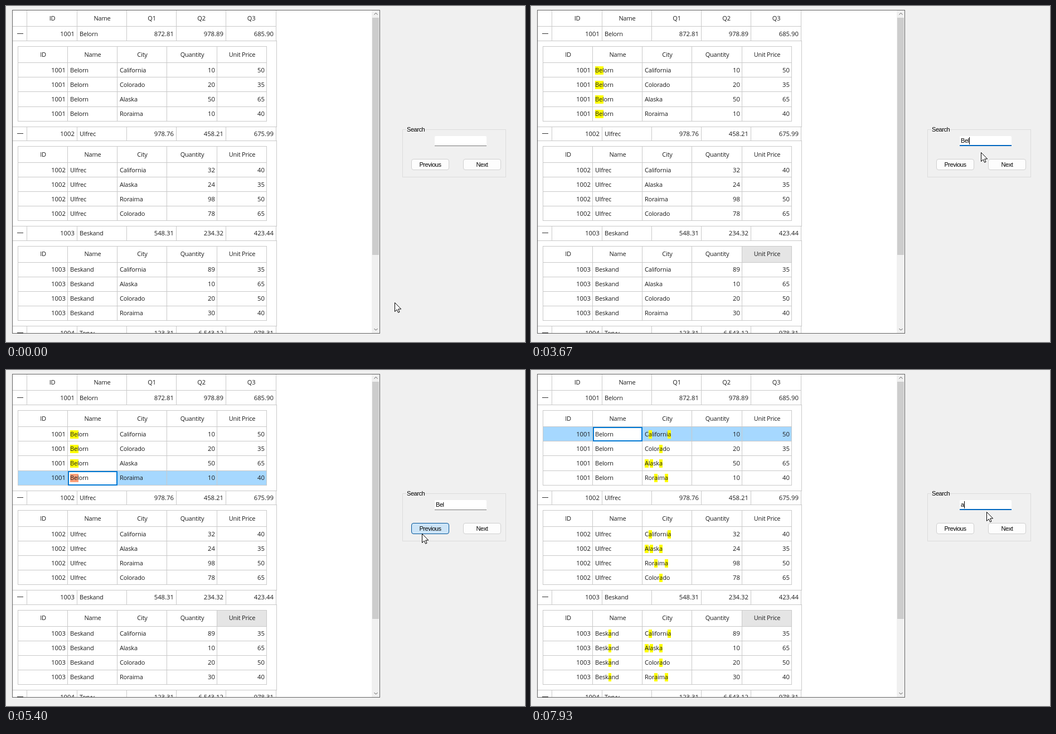
Animation, 931 px wide and 602 px high, one loop 8 s. Source, as an HTML page:

```html
<!DOCTYPE html>
<html lang="en">
<head>
<meta charset="utf-8">
<title>Grid search</title>
<style>
  html, body { margin: 0; width: 100%; height: 100%; overflow: hidden; background: #f0f0f0; }
  #stage { position: relative; width: 931px; height: 602px; overflow: hidden;
    font: 11px/15px "Open Sans", "Noto Sans", sans-serif; letter-spacing: -.2px; color: #1c1c1c; }
  #stage div, #stage svg { position: absolute; box-sizing: border-box; white-space: pre; }
  .white { background: #fff; }
  .line { background: #c9c9c9; }
  .dash { background: #333; }
  .track, .cover { background: #f0f0f0; }
  .thumb { background: #cdcdcd; }
  .frame { border: 1px solid #646464; }
  .hover { background: #e5e5e5; }
  .row { background: #a6d8ff; }
  .cell { background: #fff; border: 2px solid #0078d4; }
  .left { text-align: left; }
  .center { text-align: center; }
  .right { text-align: right; font-size: 11.3px; letter-spacing: 0; }
  mark { --c: #ff0; color: inherit; padding-bottom: 1px; background: linear-gradient(transparent 1px, var(--c) 1px); }
  .current mark { --c: #ffa07a; }
  .panel { border: 1px solid #dcdcdc; }
  .ui, .button, .field { font: 11px/15px "Liberation Sans", Arial, sans-serif; letter-spacing: -.45px; color: #000; }
  .label { background: #f0f0f0; padding: 0 1px; }
  .button { background: #fdfdfd; border: 1px solid #d0d0d0; border-radius: 4px; text-align: center; line-height: 18px; }
  .button.focus { border-color: #0078d4; }
  .button.hot { background: #e0eef9; border-color: #0078d4; }
  .button.down { background: #cce4f7; border-color: #005499; }
  .field { background: #fff; border-bottom: 1px solid #7a7a7a; border-radius: 2px 2px 0 0; padding: 1px 0 0 2px; }
  .field.focus { border-bottom: 2px solid #0067c0; }
  .field.picked span { background: #0078d7; color: #fff; }
  .field i { display: inline-block; width: 1px; height: 13px; vertical-align: -3px; background: #000; }
  #arrow, #beam { left: 0; top: 0; overflow: visible; }
  #arrow { left: -1px; top: -1px; }
</style>
</head>
<body>
<div id="stage"></div>
<script>
const stage = document.getElementById('stage');

function box(cls, x, y, w, h, html = '') {
  const el = document.createElement('div');
  el.className = cls;
  el.style.cssText = `left:${x}px;top:${y}px;width:${w}px;height:${h}px`;
  el.innerHTML = html;
  stage.append(el);
  return el;
}
const hline = (x1, x2, y) => box('line', x1, y, x2 - x1 + 1, 1);
const vline = (x, y1, y2) => box('line', x, y1, 1, y2 - y1 + 1);

// Text in the column between two grid lines, centred vertically on y
function text(align, x1, x2, y, str, pad = 3) {
  if (align === 'center') return box(align, x1 + 1, y - 8, x2 - x1, 15, str);
  if (align === 'left') return box(align, x1 + 5, y - 8, x2 - x1 - 6, 15, str);
  return box(align, x1, y - 8, x2 - x1 - pad, 15, str);
}

const outer = [37, 127, 216, 305, 394, 484];
const inner = [21, 110, 199, 288, 378, 467];
// top/end: lines around the group row, sub: top of its nested table
const groups = [
  { id: 1001, name: 'Belorn', q: ['872.81', '978.89', '685.90'], top: 36, end: 62, sub: 72.5,
    rows: [['California', 10, 50], ['Colorado', 20, 35], ['Alaska', 50, 65], ['Roraima', 10, 40]] },
  { id: 1002, name: 'Ulfrec', q: ['978.76', '458.21', '675.99'], top: 216, end: 241, sub: 251,
    rows: [['California', 32, 40], ['Alaska', 24, 35], ['Roraima', 98, 50], ['Colorado', 78, 65]] },
  { id: 1003, name: 'Beskand', q: ['548.31', '234.32', '423.44'], top: 394, end: 420, sub: 430,
    rows: [['California', 89, 35], ['Alaska', 10, 65], ['Colorado', 20, 50], ['Roraima', 30, 40]] },
  { id: 1004, name: 'Torvy', q: ['123.31', '6,543.12', '978.31'], top: 573, end: 599, rows: [] },
];
const found = [];
const rowLine = (g, k) => Math.floor(g.sub + 29 + 26.2 * k);
const groupY = i => Math.round(178.6 * i);

box('white', 11, 7, 660, 580);
const hover = box('hover', 379, 431, 88, 28);
const selRow = box('row', 22, 102, 445, 25);

// Grid lines
outer.forEach(x => vline(x, 8, 36));
groups.forEach((g, i) => {
  hline(12, 484, g.top);
  hline(12, 484, g.end);
  outer.forEach(x => vline(x, g.top, g.end));
  if (!g.rows.length) return;
  const y = Math.floor(g.sub);
  vline(485, g.end, groups[i + 1].top);
  inner.forEach(x => vline(x, y, rowLine(g, 4)));
  hline(21, 467, y);
  for (let k = 0; k <= 4; k++) hline(21, 467, rowLine(g, k));
});
const selCell = box('cell', 111, 102, 89, 26);

// Grid text
['ID', 'Name', 'Q1', 'Q2', 'Q3'].forEach((s, c) => text('center', outer[c], outer[c + 1], 22, s));
groups.forEach((g, i) => {
  const y = 50 + groupY(i);
  box('dash', 20, y - 1, 11, 1);
  text('right', outer[0], outer[1], y, g.id, 4);
  text('left', outer[1], outer[2], y, g.name);
  g.q.forEach((s, c) => text('right', outer[c + 2], outer[c + 3], y, s, 4));
  if (!g.rows.length) return;
  ['ID', 'Name', 'City', 'Quantity', 'Unit Price'].forEach((s, c) =>
    text('center', inner[c], inner[c + 1], y + 37, s));
  g.rows.forEach(([city, qty, price], k) => {
    const ry = y + 65 + 26 * k;
    text('right', inner[0], inner[1], ry, g.id);
    [g.name, city].forEach((str, c) =>
      found.push({ str, el: text('left', inner[c + 1], inner[c + 2], ry, str) }));
    text('right', inner[3], inner[4], ry, qty);
    text('right', inner[4], inner[5], ry, price);
  });
});

// Scroll bar and frame
box('track', 656, 8, 14, 578);
box('thumb', 657, 21, 12, 425);
const chevron = (y, d) => `<path d="M660.5 ${y + d}l3 ${-2 * d}l3 ${2 * d}" fill="none" stroke="#555"/>`;
stage.insertAdjacentHTML('beforeend',
  `<svg width="931" height="602" style="left:0;top:0">${chevron(14, 1.5)}${chevron(579.5, -1.5)}</svg>`);
box('cover', 0, 587, 931, 15);
box('frame', 11, 7, 660, 580);

// Search panel
box('panel', 711, 221, 186, 86);
box('ui label', 718, 214, 33, 15, 'Search');
const field = box('field', 769, 233, 93, 18, '<span></span><i></i>');
const [typed, caret] = field.children;
const prev = box('button', 727, 274, 68, 20, 'Previous');
const next = box('button', 820, 274, 68, 20, 'Next');

stage.insertAdjacentHTML('beforeend', `
  <svg id="arrow" width="13" height="20"><path d="M.5 .5V16.5L4.2 13L6.6 18.3L9 17.2L6.7 12H11.7Z" fill="#fff" stroke="#000"/></svg>
  <svg id="beam" width="8" height="18"><path d="M-3 -7.5H-1L.5 -6.5L2 -7.5H4M.5 -6.5V6.5M-3 7.5H-1L.5 6.5L2 7.5H4" fill="none" stroke="#000"/></svg>`);
const pointers = { arrow: document.getElementById('arrow'), beam: document.getElementById('beam') };

// Timelines: [start ms, value]
const query = [[0, ''], [2000, 'B'], [2470, 'Be'], [2600, 'Bel'], [7470, 'a']];
const focus = [[0, 0], [1330, 1], [4130, 0], [6600, 1]];
const blink = [[0, 0], [1330, 1], [3130, 0], [3660, 1], [4130, 0], [7470, 1]];
const picked = [[0, 0], [6730, 1], [7470, 0]];
const chosen = [[0, -1], [4200, 0], [4530, 1], [4730, 2], [4930, 3], [5530, 2], [5870, 1], [6070, 0]];
const nextLook = [[0, ''], [3870, 'hot'], [4130, 'down'], [4200, 'hot'], [4470, 'down'], [4530, 'hot'],
  [4670, 'down'], [4730, 'hot'], [4870, 'down'], [4930, 'hot'], [5070, 'focus'], [5400, '']];
const prevLook = [[0, ''], [5270, 'hot'], [5400, 'down'], [5530, 'hot'], [5730, 'down'], [5870, 'hot'],
  [5930, 'down'], [6070, 'hot'], [6200, 'focus'], [6600, '']];
const pointer = [[0, 'arrow'], [1130, 'beam'], [2000, ''], [3400, 'beam'], [3600, 'arrow'],
  [6330, 'beam'], [7470, ''], [7870, 'beam'], [7930, 'arrow']];
// Pointer path: [ms, x, y]
const path = [[0, 702, 533], [270, 440, 446], [400, 600, 350], [600, 790, 240], [730, 817, 223], [867, 817, 223],
  [930, 773, 226], [1130, 784, 240], [1470, 790, 243], [3400, 790, 243], [3600, 800, 256], [3870, 829, 284],
  [4070, 837, 291], [4200, 837, 288], [4930, 837, 288], [5070, 818, 291], [5270, 760, 294], [5400, 747, 294],
  [5530, 747, 292], [5730, 747, 291], [6070, 747, 291], [6330, 802, 243], [7800, 802, 243], [7870, 808, 246],
  [7930, 818, 255], [8000, 818, 255]];

const at = (line, t) => line.findLast(e => e[0] <= t)[1];

function along(t) {
  const i = Math.max(1, path.findIndex(p => p[0] > t));
  const [t0, x0, y0] = path[i - 1], [t1, x1, y1] = path[i];
  const f = (t - t0) / (t1 - t0);
  return [x0 + (x1 - x0) * f, y0 + (y1 - y0) * f].map(Math.round);
}

let shown;
function mark(q) {
  if (q === shown) return;
  shown = q;
  typed.textContent = q;
  found.forEach(({ str, el }) => {
    el.innerHTML = q ? str.replace(RegExp(q, 'gi'), '<mark>$&</mark>') : str;
  });
}

function render(ms) {
  const t = Math.floor((ms + 4) * .015) / .015 % 8000 + 4;
  mark(at(query, t));

  const row = at(chosen, t);
  selRow.hidden = selCell.hidden = row < 0;
  selRow.style.top = selCell.style.top = rowLine(groups[0], row) + 1 + 'px';
  for (let k = 0; k < 4; k++) found[2 * k].el.classList.toggle('current', k === row);

  hover.hidden = t < 270;
  field.classList.toggle('focus', !!at(focus, t));
  field.classList.toggle('picked', !!at(picked, t));
  caret.style.visibility = at(blink, t) ? 'visible' : 'hidden';
  next.className = 'button ' + at(nextLook, t);
  prev.className = 'button ' + at(prevLook, t);

  const kind = at(pointer, t), [x, y] = along(t);
  for (const k in pointers) {
    pointers[k].style.display = k === kind ? 'block' : 'none';
    pointers[k].style.transform = `translate(${x}px,${y}px)`;
  }
}

const start = performance.now();
function loop() {
  render(performance.now() - start);
  requestAnimationFrame(loop);
}
loop();
</script>
</body>
</html>
```
